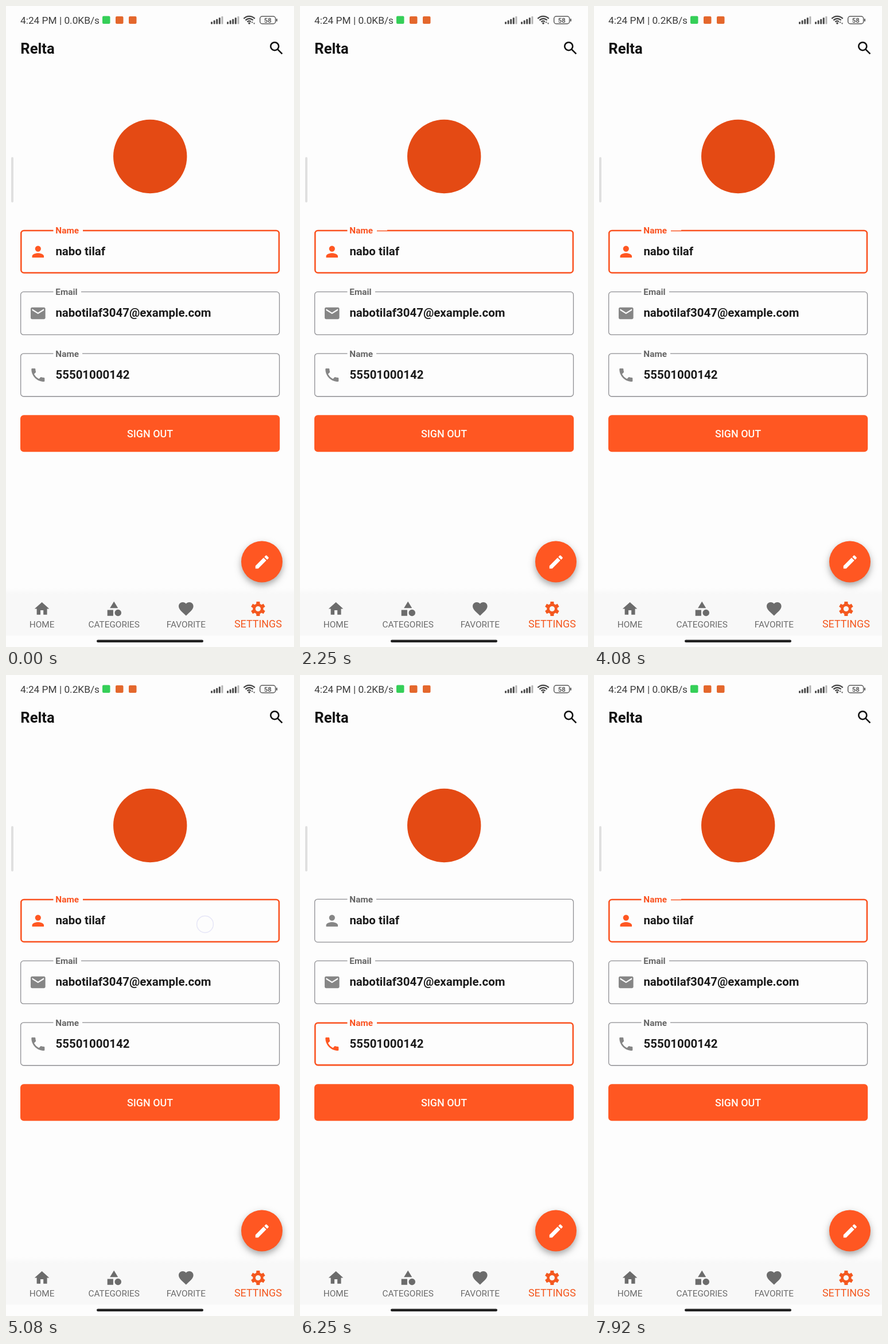
These frames come from a looping animation (502x1116 px, 8000 ms). An HTML page with a canvas:

```html
<!DOCTYPE html>
<html lang="en">
<head>
<meta charset="utf-8">
<title>Settings screen</title>
<style>
html, body { margin: 0; width: 100%; height: 100%; overflow: hidden; background: #fdfdfd; }
canvas { display: block; width: 502px; height: 1116px; }
</style>
</head>
<body>
<canvas id="stage" width="502" height="1116"></canvas>
<script>
const ctx = document.getElementById('stage').getContext('2d');
const LOOP = 8000;
const DP = 1.28;
const BG = '#fdfdfd', ORANGE = [250, 82, 32], GRAY = [142, 142, 146], LABEL = [102, 102, 102];
const ACCENT = '#ff5722', NAV = '#6c6c6c';

const FIELDS = [
  { label: 'Name', value: 'nabo tilaf', icon: 'person', gap: 133 },
  { label: 'Email', value: 'nabotilaf3047@example.com', icon: 'mail', gap: 131 },
  { label: 'Name', value: '55501000142', icon: 'phone', gap: 133 }
];
// when each field takes the focus
const FOCUS = [[-1000, 0], [5420, 1], [5810, 2], [6400, 0]];
const TAPS = [
  { at: 4890, x: 347, y: 434 },
  { at: 5320, x: 296, y: 533 },
  { at: 5720, x: 242, y: 631 },
  { at: 6300, x: 310, y: 432 }
];

const disc = (x, y, r) => {
  const p = new Path2D();
  p.arc(x, y, r, 0, 7);
  return p;
};

function gear() {
  const p = new Path2D();
  for (let i = 0; i < 6; i++) {
    const mid = -Math.PI / 2 + i * Math.PI / 3;
    for (const [da, r] of [[-0.36, 7.2], [-0.23, 10], [0.23, 10], [0.36, 7.2]])
      p.lineTo(12 + r * Math.cos(mid + da), 12 + r * Math.sin(mid + da));
  }
  p.closePath();
  p.addPath(disc(12, 12, 3.6));
  return p;
}

function person() {
  const p = new Path2D('M12 14c-2.67 0-8 1.34-8 4v2h16v-2c0-2.66-5.33-4-8-4z');
  p.addPath(disc(12, 8, 4));
  return p;
}

function shapes() {
  const p = new Path2D('M12 2l-5.5 9h11zM3 13.5h8v8H3z');
  p.addPath(disc(17.5, 17.5, 4.5));
  return p;
}

const ICONS = {
  person: person(),
  mail: new Path2D('M20 4H4c-1.1 0-2 .9-2 2v12c0 1.1.9 2 2 2h16c1.1 0 2-.9 2-2V6c0-1.1-.9-2-2-2zm0 4l-8 5-8-5V6l8 5 8-5z'),
  phone: new Path2D('M6.62 10.79c1.44 2.83 3.76 5.14 6.59 6.59l2.2-2.2c.27-.27.67-.36 1.02-.24 1.12.37 2.33.57 3.57.57.55 0 1 .45 1 1V20c0 .55-.45 1-1 1C10.61 21 3 13.39 3 4c0-.55.45-1 1-1h3.5c.55 0 1 .45 1 1 0 1.25.2 2.45.57 3.57.11.35.03.74-.25 1.02z'),
  edit: new Path2D('M3 17.25V21h3.75L17.81 9.94l-3.75-3.75zM20.71 7.04c.39-.39.39-1.02 0-1.41l-2.34-2.34c-.39-.39-1.02-.39-1.41 0l-1.83 1.83 3.75 3.75z'),
  home: new Path2D('M10 20v-6h4v6h5v-8h3L12 3 2 12h3v8z'),
  shapes: shapes(),
  heart: new Path2D('M12 21.35l-1.45-1.32C5.4 15.36 2 12.28 2 8.5 2 5.42 4.42 3 7.5 3c1.74 0 3.41.81 4.5 2.09C13.09 3.81 14.76 3 16.5 3 19.58 3 22 5.42 22 8.5c0 3.78-3.4 6.86-8.55 11.54z'),
  gear: gear()
};

const clamp = v => Math.max(0, Math.min(1, v));
const mix = (a, b, k) => `rgb(${a.map((v, i) => Math.round(v + (b[i] - v) * k)).join(',')})`;

function text(str, x, y, size, weight, color, align = 'left') {
  ctx.font = `${weight} ${size}px Roboto, sans-serif`;
  ctx.textAlign = align;
  ctx.fillStyle = color;
  ctx.fillText(str, x, y);
}

function icon(name, x, y, color) {
  ctx.save();
  ctx.translate(x, y);
  ctx.scale(DP, DP);
  ctx.translate(-12, -12);
  ctx.fillStyle = color;
  ctx.fill(ICONS[name], 'evenodd');
  ctx.restore();
}

function box(x, y, w, h, r, color) {
  ctx.beginPath();
  ctx.roundRect(x, y, w, h, r);
  ctx.fillStyle = color;
  ctx.fill();
}

function circle(x, y, r, color) {
  ctx.fillStyle = color;
  ctx.fill(disc(x, y, r));
}

function signal(x) {
  for (let i = 0; i < 5; i++) {
    const h = 4 + i * 2.4;
    box(x + i * 4.6, 31.5 - h, 3, h, 0.8, i < 4 ? '#4a4a4a' : '#b4b4b4');
  }
}

function wifi(arrows) {
  ctx.strokeStyle = '#444';
  ctx.lineWidth = 2.3;
  for (const r of [4.8, 9, 13.2]) {
    ctx.beginPath();
    ctx.arc(424, 31, r, -Math.PI / 2 - 0.82, -Math.PI / 2 + 0.82);
    ctx.stroke();
  }
  circle(424, 30, 1.8, '#444');
  if (!arrows) return;
  box(427, 25.5, 7, 7, 0, BG);
  ctx.fillStyle = '#555';
  ctx.fill(new Path2D('M427.5 29.2l1.6-2.6 1.6 2.6zM431 29.4h3.2l-1.6 2.6z'));
}

function statusBar(t) {
  const speed = t >= 3600 && t < 7600 ? '0.2' : '0.0';
  text(`4:24 PM | ${speed}KB/s`, 25, 31, 17.3, 400, '#3c3c3c');
  box(168, 17.5, 13.5, 13.5, 2, '#35cf58');
  box(191, 18, 13.5, 13, 2, '#e4672c');
  box(214, 18, 13.5, 13, 2, '#e4672c');
  signal(357);
  signal(385);
  wifi(t < 5400 || t >= 7600);
  ctx.strokeStyle = '#5a5a5a';
  ctx.lineWidth = 1.5;
  ctx.beginPath();
  ctx.roundRect(442.7, 18, 27, 13, 4);
  ctx.stroke();
  box(471, 22, 2, 5, 1, '#5a5a5a');
  text('58', 456.2, 28.6, 11.5, 500, '#444', 'center');
}

function header() {
  text('Relta', 25.3, 83, 25.6, 700, '#111');
  ctx.strokeStyle = '#111';
  ctx.lineWidth = 2.6;
  ctx.beginPath();
  ctx.arc(468.3, 70.2, 7, 0, 7);
  ctx.stroke();
  ctx.beginPath();
  ctx.moveTo(473.4, 75.3);
  ctx.lineTo(481.4, 83.3);
  ctx.stroke();
}

function focusAt(t) {
  let i = FOCUS.length - 1;
  while (FOCUS[i][0] > t) i--;
  const prev = FOCUS[Math.max(0, i - 1)][1];
  return { now: FOCUS[i][1], prev, k: clamp((t - FOCUS[i][0]) / 167) };
}

function field(f, i, focus, t) {
  const top = 389.7 + i * 107.35, left = 25, right = 477.2, bottom = top + 76;
  const active = focus.now === i;
  const level = active ? focus.k : focus.prev === i ? 1 - focus.k : 0;
  const line = DP * (1 + level), h = line / 2, r = 5;
  const gapEnd = f.gap + level;

  ctx.strokeStyle = mix(GRAY, ORANGE, level);
  ctx.lineWidth = line;
  ctx.beginPath();
  ctx.moveTo(gapEnd, top + h);
  ctx.arcTo(right - h, top + h, right - h, bottom - h, r);
  ctx.arcTo(right - h, bottom - h, left + h, bottom - h, r);
  ctx.arcTo(left + h, bottom - h, left + h, top + h, r);
  ctx.arcTo(left + h, top + h, 82, top + h, r);
  ctx.lineTo(82.5, top + h);
  ctx.stroke();

  // lighter stretch of the outline beside the first label
  if (i === 0 && (t >= 700 && t < 4800 || t >= 7300)) box(133, top - 1, 19, 2.1, 0, BG);

  text(f.label, 86.3, top + 6.4, 15.36, 700, mix(LABEL, ORANGE, level));
  text(f.value, 86.4, top + 44.4, 20.48, 700, '#1a1a1a');
  icon(f.icon, 55.8, top + 38, active ? ACCENT : '#868686');
}

function button() {
  box(25, 712.3, 452.2, 64, 6, ACCENT);
  text('SIGN OUT', 251, 751, 17.92, 500, '#fff8f2', 'center');
}

function fab() {
  ctx.save();
  ctx.shadowColor = 'rgba(0,0,0,.34)';
  ctx.shadowBlur = 12;
  ctx.shadowOffsetY = 5;
  circle(446, 967.5, 36, ACCENT);
  ctx.restore();
  icon('edit', 446.3, 968, '#fff');
}

function navBar() {
  const shade = ctx.createLinearGradient(0, 1014, 0, 1024);
  shade.addColorStop(0, BG);
  shade.addColorStop(1, '#f8f8f8');
  ctx.fillStyle = shade;
  ctx.fillRect(0, 1014, 502, 82);
  const tabs = [['home', 'HOME'], ['shapes', 'CATEGORIES'], ['heart', 'FAVORITE'], ['gear', 'SETTINGS']];
  tabs.forEach(([name, label], i) => {
    const x = 62.6 + i * 125.6, on = i === 3;
    icon(name, x, 1049.5, on ? '#f4581f' : NAV);
    text(label, x, on ? 1082 : 1082.2, on ? 17.92 : 15.36, 400, on ? '#f4581f' : NAV, 'center');
  });
  box(158, 1103.5, 186, 4.6, 2.3, '#222');
}

function touches(t) {
  for (const tap of TAPS) {
    const age = t - tap.at;
    if (age < 0 || age > 270) continue;
    ctx.globalAlpha = clamp(age / 40) * clamp((270 - age) / 160);
    circle(tap.x, tap.y, 14, 'rgba(255,255,255,.55)');
    ctx.strokeStyle = '#cfcff0';
    ctx.lineWidth = 1.5;
    ctx.stroke(disc(tap.x, tap.y, 14.4));
    ctx.globalAlpha = 1;
  }
}

function draw(t) {
  ctx.fillStyle = BG;
  ctx.fillRect(0, 0, 502, 1116);
  statusBar(t);
  header();
  circle(251.2, 262, 64.2, '#e44a14');
  box(9, 263, 4, 79, 2, '#e0e0e0');
  const focus = focusAt(t);
  FIELDS.forEach((f, i) => field(f, i, focus, t));
  button();
  navBar();
  fab();
  touches(t);
}

const start = performance.now();
function tick() {
  draw((performance.now() - start) % LOOP);
  requestAnimationFrame(tick);
}
tick();
</script>
</body>
</html>
```
